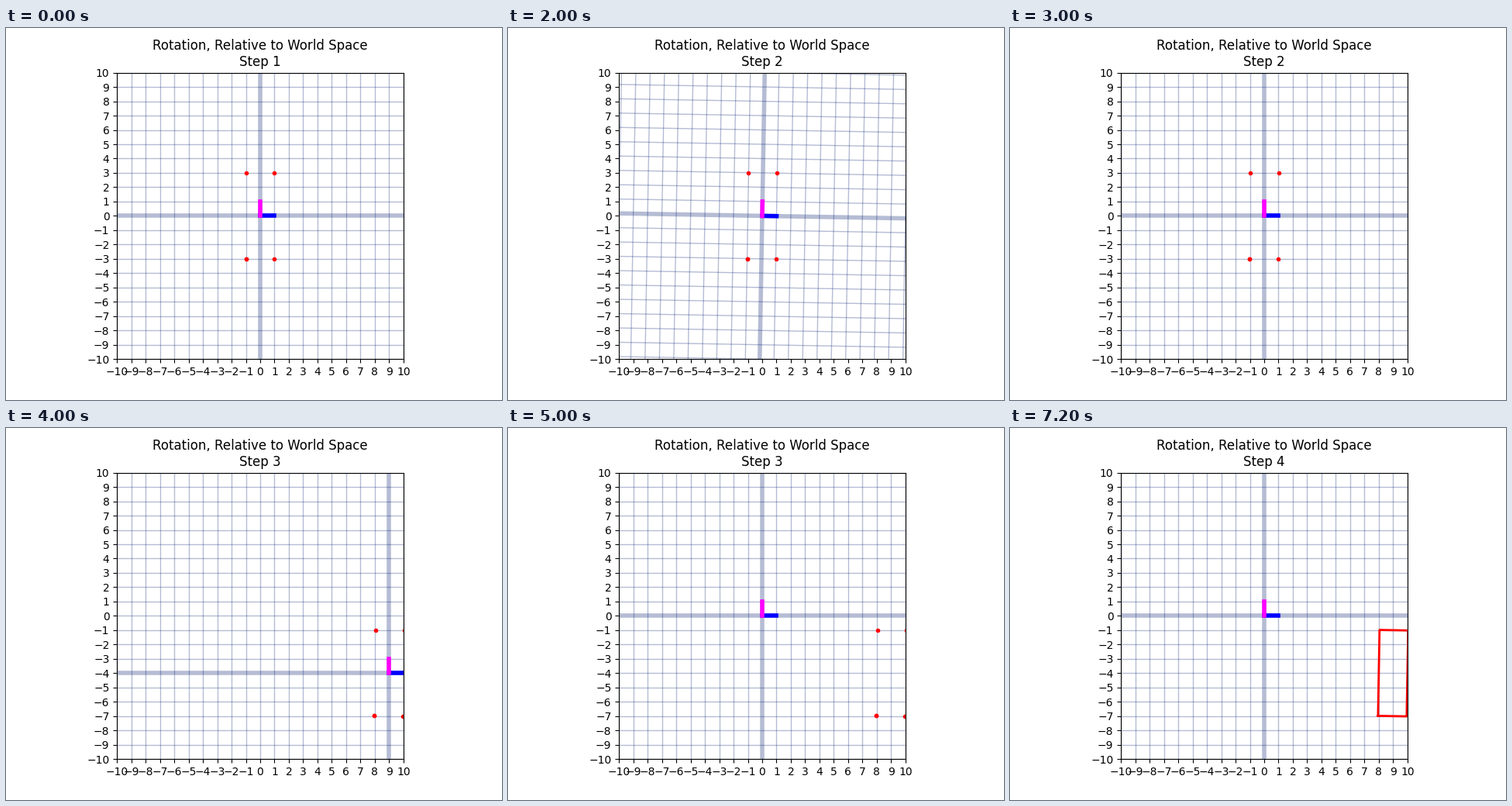
Write a matplotlib script that moves like this. It is 640 px wide and 480 px high and loops after 8 s.

```python
import numpy as np
import matplotlib.pyplot as plt
from matplotlib.animation import FuncAnimation

GRID = dict(color="#0a2472", alpha=0.3)
REACH = 30
SHIFT = np.array([9, -4])
TILT = np.radians(-1)

# One state per second: (step, grid angle, grid origin, corners turned, corners moved, outlined)
HOME = np.zeros(2)
START = (1, 0, HOME, False, False, False)
TURN = (2, TILT, HOME, True, False, False)
RESET = (2, 0, HOME, True, False, False)
MOVE = (3, 0, SHIFT, True, True, False)
RETURN = (3, 0, HOME, True, True, False)
FINISH = (4, 0, HOME, True, True, True)
STATES = [START, START, TURN, RESET, MOVE, RETURN, FINISH, FINISH]

CORNERS = np.array([(-1, -3), (-1, 3), (1, 3), (1, -3), (-1, -3)], float)


def rotate(points, angle):
    c, s = np.cos(angle), np.sin(angle)
    return np.asarray(points, float) @ np.array([(c, s), (-s, c)])


fig, ax = plt.subplots(figsize=(6.4, 4.8), dpi=100)
ax.set_aspect("equal")
ax.set_xlim(-10, 10)
ax.set_ylim(-10, 10)
ax.set_xticks(range(-10, 11))
ax.set_yticks(range(-10, 11))
title = ax.set_title("")

frame_lines = []


def add_line(a, b, **style):
    line, = ax.plot([], [], **style)
    frame_lines.append((line, np.array([a, b], float)))


for k in range(-REACH, REACH + 1):
    width = 1 if k else 4
    add_line((k, -REACH), (k, REACH), lw=width, **GRID)
    add_line((-REACH, k), (REACH, k), lw=width, **GRID)

dots, = ax.plot([], [], "r.")
outline, = ax.plot([], [], "r-", lw=2)
add_line((0, 0), (1, 0), color="blue", lw=4)
add_line((0, 0), (0, 1), color="magenta", lw=4)


def draw(i):
    step, angle, origin, turned, moved, outlined = STATES[i % len(STATES)]
    title.set_text(f"Rotation, Relative to World Space\nStep {step}")
    for line, ends in frame_lines:
        line.set_data(*(rotate(ends, angle) + origin).T)
    corners = rotate(CORNERS, TILT * turned) + SHIFT * moved
    for artist, shown in ((dots, not outlined), (outline, outlined)):
        artist.set_data(*corners.T)
        artist.set_visible(shown)
    return []


anim = FuncAnimation(fig, draw, frames=len(STATES), interval=1000,
                     init_func=lambda: draw(0), repeat=True, repeat_delay=0)
plt.show()
```
